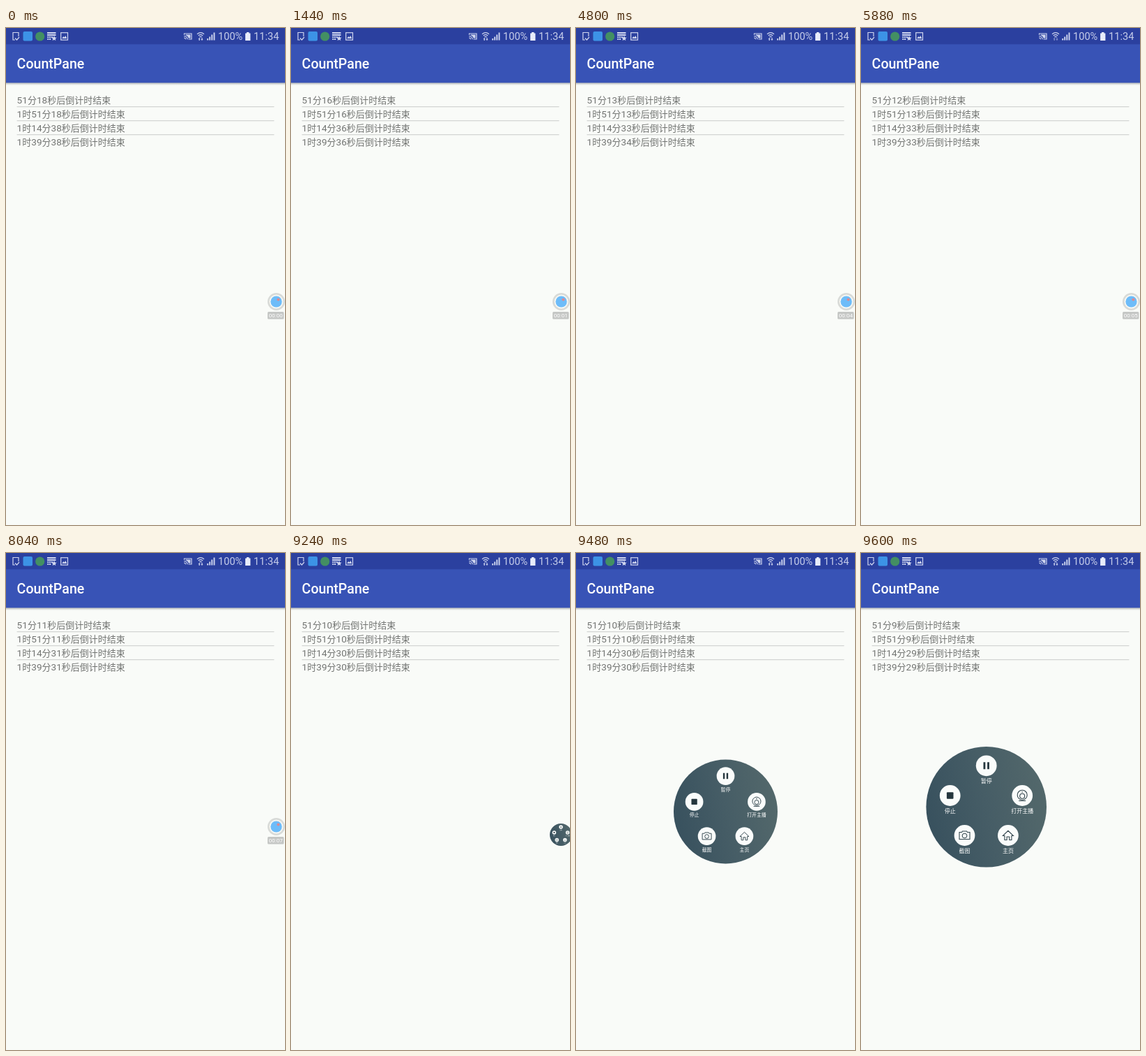
An HTML page that plays this animation: 400x711 px, repeating every 9.72 s.

```html
<!DOCTYPE html>
<html lang="zh-CN">
<head>
<meta charset="utf-8">
<title>Countdown</title>
<style>
  html, body { margin: 0; width: 100%; height: 100%; overflow: hidden; background: #f9fbf8; }
  svg { display: block; width: 100vw; height: 100vh; }
  text { font-family: Roboto, "Noto Sans CJK SC", "Noto Sans CJK", sans-serif; }
  .title { font-size: 19.6px; font-weight: 500; fill: #fff; }
  .status { font-size: 14.6px; fill: #c6cdea; }
  .rows { font-size: 13px; fill: #727472; }
  .rows tspan { font-size: 13.6px; }
  .clock { font-size: 8px; fill: #fff; text-anchor: middle; }
  .menu text { font-size: 8px; fill: #fff; text-anchor: middle; }
  .line { fill: none; stroke: #d0d6ef; stroke-width: 1.2; }
  .bold { stroke-width: 1.9; }
  .solid { fill: #d0d6ef; }
  .glyph { fill: none; stroke: #33464e; stroke-width: 1.1; }
  .dark { fill: #25363e; }
</style>
</head>
<body>
<svg viewBox="0 0 400 711">
  <defs>
    <linearGradient id="shade" x1="0" y1="0" x2="0" y2="1">
      <stop offset="0" stop-color="#8c908f" stop-opacity=".65"/>
      <stop offset="1" stop-color="#8c908f" stop-opacity="0"/>
    </linearGradient>
    <linearGradient id="disc" x1="0" y1=".6" x2="1" y2=".4">
      <stop offset="0" stop-color="#38515e"/>
      <stop offset=".5" stop-color="#465d66"/>
      <stop offset="1" stop-color="#53686b"/>
    </linearGradient>
  </defs>

  <rect width="400" height="711" fill="#f9fbf8"/>
  <rect y="78" width="400" height="4" fill="url(#shade)"/>
  <rect y="23" width="400" height="55.4" fill="#3853b6"/>
  <rect width="400" height="23.3" fill="#2b409f"/>
  <text class="title" x="15.6" y="58">CountPane</text>

  <!-- notification icons -->
  <path class="line" d="M13 17H10V6.5H18V12M13 14.5L15.5 17L19 13"/>
  <rect x="24.5" y="5" width="13.5" height="13.5" rx="2" fill="#3c93e6"/>
  <circle cx="48.7" cy="12" r="6.6" fill="#438f63"/>
  <path class="line bold" d="M59 7H71.5M59 10H71.5"/>
  <path class="line bold" d="M59.3 13H67M59.3 16H65" stroke-dasharray="2 .8"/>
  <path class="solid" d="M69 11l1.1 2.4 2.6.3-1.9 1.8.5 2.6-2.3-1.3-2.3 1.3.5-2.6-1.9-1.8 2.6-.3z"/>
  <rect class="line" x="78.7" y="6.7" width="9.8" height="10.4"/>
  <path class="solid" d="M80.3 15l2-3 1.5 1.4 1.5-2.4 2 4z"/>

  <!-- system icons -->
  <path class="line" d="M255.5 9.8V8H266V16H261.5M255.3 11.6a4.8 4.8 0 0 1 4.7 4.7M255.3 14a2.4 2.4 0 0 1 2.2 2.3"/>
  <path class="solid" d="M257.6 9.6H264.4V14.4H261.6Q260.6 11 257.6 10.4z"/>
  <path class="line" d="M274 8.8q5-4.2 10 0M275.8 11q3.2-2.6 6.4 0M277.4 13q1.6-1.2 3.2 0"/>
  <g id="traffic" class="solid">
    <path d="M277.2 14l1.6 2h-1v2h-1.2v-2h-1z"/>
    <path d="M281 18l-1.6-2h1v-2h1.2v2h1z"/>
  </g>
  <path class="line bold" d="M289.2 17.6V15M292.2 17.6V12.5M295.3 17.6V9.5M298.5 17.6V6.5"/>
  <text class="status" x="304" y="17.4">100%</text>
  <path fill="#e8ecfa" d="M345 6h3.5v1.4h1.9V18h-7.3V7.4H345z"/>
  <text class="status" x="355" y="17.4">11:34</text>

  <path d="M15.6 112.6H384.4M15.6 132.6H384.4M15.6 152.6H384.4" stroke="#d3d5d3" stroke-width="1.2"/>
  <g id="rows" class="rows"></g>

  <g id="recorder">
    <circle cx="387.5" cy="391.5" r="12.5" fill="#d8dad7"/>
    <circle cx="387.5" cy="391.5" r="10" fill="#f5f7f4"/>
    <circle cx="387.5" cy="391.5" r="8.1" fill="#6dbcf9"/>
    <circle cx="390.4" cy="388.5" r="2.1" fill="#d98a93"/>
    <rect x="375" y="406" width="23.4" height="10.4" rx="1.5" fill="#c5c7c5"/>
    <text id="clock" class="clock" x="386.7" y="414.2"></text>
  </g>

  <g id="menu" class="menu">
    <circle r="86.3" fill="url(#disc)"/>
    <g id="buttons"></g>
  </g>
</svg>

<script>
const LOOP = 9720, STEP = 120;
const $ = id => document.getElementById(id);

// Ticks are counted in steps of 120 ms.
const middle = [2, 11, 21, 30, 40, 50, 59, 69, 80];
const timers = [
  { head: '51分', from: 18, ticks: [1, 11, 21, 30, 40, 49, 59, 69, 80] },
  { head: '1时51分', from: 18, ticks: middle },
  { head: '1时14分', from: 38, ticks: middle },
  { head: '1时39分', from: 38, ticks: [2, 12, 22, 31, 41, 50, 60, 69, 80] }
];
const clockTicks = [5, 15, 25, 34, 44, 54, 63, 73];
const MENU_START = 77;
const menuRadii = [16, 47, 74.5, 86.3];

const buttons = [
  [0, -59, '暂停', '<path class="dark" d="M-4.2-5h2.8V5h-2.8zM1.4-5h2.8V5H1.4z"/>'],
  [-52, -16.3, '停止', '<rect class="dark" x="-4.8" y="-4.8" width="9.6" height="9.6" rx="1"/>'],
  [51.5, -16.3, '打开主播', '<g class="glyph"><circle cy="-.8" r="7"/><circle cy=".8" r="3.5"/><path d="M-1-5H1M-5 7.5H5"/></g>'],
  [-31.2, 40.7, '截图', '<g class="glyph"><path d="M-7.5-4.5H-4L-3-6H3L4-4.5H7.5V5.5H-7.5z"/><circle cy=".5" r="3.3"/></g>'],
  [31.2, 40.7, '主页', '<path class="glyph" d="M-7.5.5L0-6.7L7.5.5H5V6.5H1.8V2H-1.8V6.5H-5V.5z"/>']
];
$('buttons').innerHTML = buttons.map(([x, y, label, glyph]) =>
  `<g transform="translate(${x} ${y})"><circle r="14.9" fill="#fafcfb"/>${glyph}<text y="25">${label}</text></g>`
).join('');

$('rows').innerHTML = timers.map((_, i) => `<text x="15.6" y="${108.2 + 20 * i}"></text>`).join('');
const rowTexts = [...$('rows').children];

const passed = (ticks, n) => ticks.filter(k => k <= n).length;
const show = (el, on) => el.setAttribute('visibility', on ? 'visible' : 'hidden');

function placeMenu(n) {
  const r = menuRadii[n - MENU_START];
  show($('menu'), r);
  if (!r) return;
  // The centre travels in a straight line as the disc grows.
  const p = (r - 16) / 70.3;
  const x = 387 - 207.3 * p, y = 403 - 39.7 * p;
  $('menu').setAttribute('transform', `translate(${x} ${y}) scale(${r / 86.3})`);
}

function draw(n) {
  timers.forEach(({ head, from, ticks }, i) => {
    const label = `${head}${from - passed(ticks, n)}秒后倒计时结束`;
    // Digits are set slightly larger than the characters around them.
    rowTexts[i].innerHTML = label.replace(/\d+/g, '<tspan>$&</tspan>');
  });
  $('clock').textContent = `00:0${passed(clockTicks, n)}`;
  $('traffic').setAttribute('opacity', n >= 49 && n < 54 ? .55 : 1);
  show($('recorder'), n < MENU_START - 1);
  placeMenu(n);
}

let start, last = -1;
function frame(now) {
  start ??= now;
  const n = Math.floor(((now - start) % LOOP) / STEP);
  if (n !== last) draw(last = n);
  requestAnimationFrame(frame);
}
draw(0);
requestAnimationFrame(frame);
</script>
</body>
</html>
```
